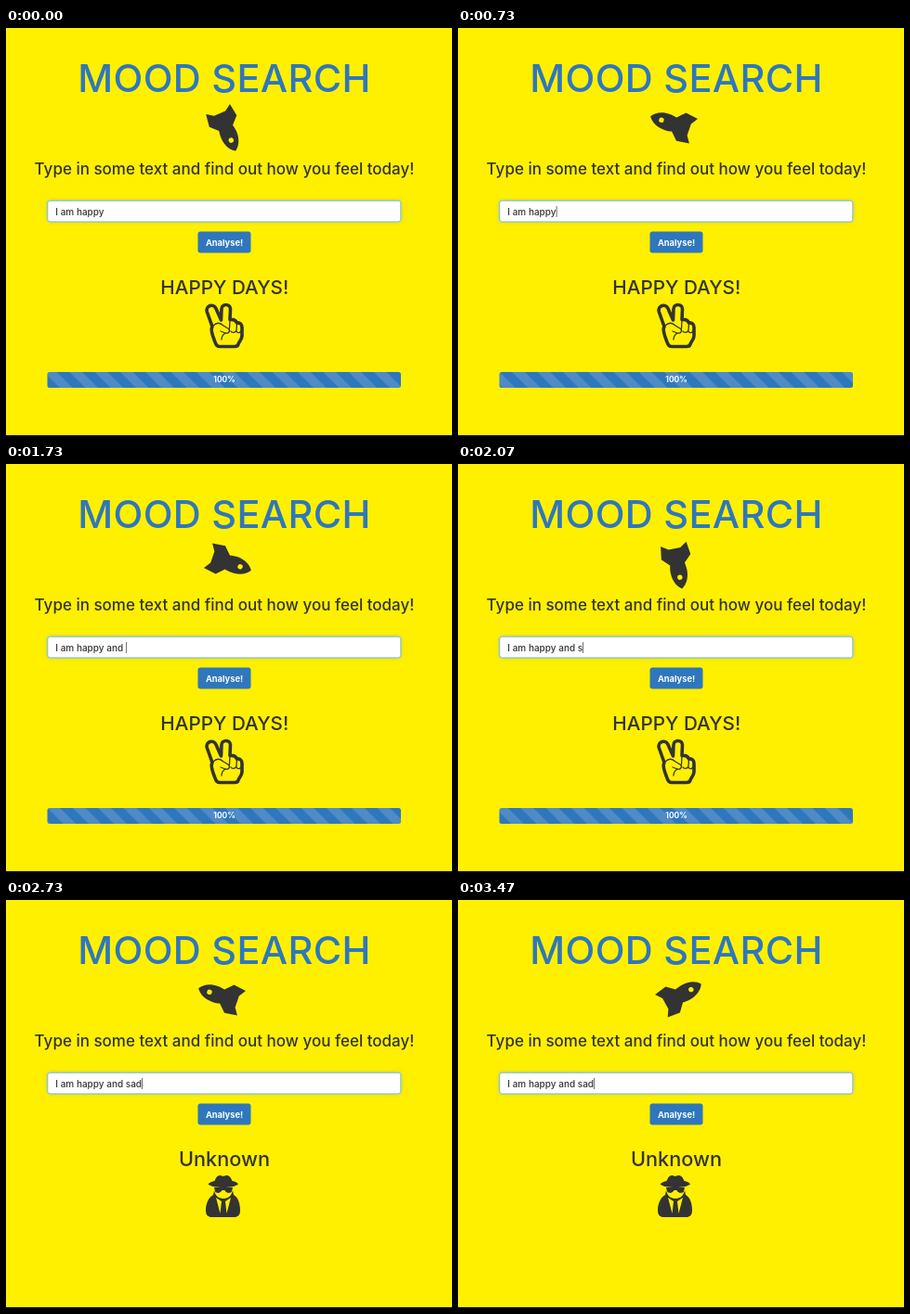
These frames come from a looping animation (480 px wide and 440 px high, 3540 ms). An HTML page:

```html
<!DOCTYPE html>
<html lang="en">
<head>
<meta charset="utf-8">
<title>Mood search</title>
<style>
  html, body { margin: 0; width: 100%; height: 100%; overflow: hidden; background: #fff000; }
  svg { display: block; width: 480px; height: 440px; }
  text { font-family: Inter, sans-serif; font-weight: 500; fill: #333; white-space: pre; }
  .mid { text-anchor: middle; }
  .label { font-weight: 700; fill: #fff; }
  .dark { fill: #333; }
  .blue { fill: #2f77bd; }
  .line { fill: none; stroke: #333; stroke-linejoin: round; stroke-linecap: round; }
</style>
</head>
<body>
<svg viewBox="0 0 480 440">
  <defs>
    <pattern id="stripes" width="28" height="28" patternUnits="userSpaceOnUse">
      <path d="M0 14 14 28H0ZM0 0H14L28 14V28Z" fill="#fff" fill-opacity=".15"/>
    </pattern>
    <filter id="glow" x="-5%" y="-50%" width="110%" height="200%">
      <feGaussianBlur stdDeviation="2"/>
    </filter>
  </defs>
  <rect width="480" height="440" fill="#fff000"/>
  <rect y="439" width="480" height="1" fill="#222"/>

  <text class="mid blue" x="235" y="69" font-size="41.5" letter-spacing=".3">MOOD SEARCH</text>
  <g id="rocket">
    <path class="dark" d="M0-30C6-26 9-19 9-11 9-8 8.500-5 8-3L16 5 14 19 6.500 14H-6.500L-14 19-16 5-8-3C-8.500-5-9-8-9-11-9-19-6-26 0-30Z"/>
    <circle cy="-17.500" r="2.700" fill="#fff000"/>
  </g>
  <text class="mid" x="235" y="158" font-size="17">Type in some text and find out how you feel today!</text>

  <rect x="44.500" y="186" width="380.500" height="23" rx="3" fill="#66afe9" opacity=".6" filter="url(#glow)"/>
  <rect x="44.800" y="186.300" width="380" height="22.600" rx="2.500" fill="#fff" stroke="#66afe9" stroke-width=".8"/>
  <text id="typed" x="53.300" y="201.500" font-size="10"></text>
  <rect id="caret" y="192" width=".7" height="12" fill="#333"/>

  <rect class="blue" x="206.500" y="219.500" width="57" height="23" rx="2.700"/>
  <text class="mid label" x="235" y="234.500" font-size="9.300">Analyse!</text>

  <g id="happy">
    <text class="mid" x="235.300" y="287" font-size="20.700">HAPPY DAYS!</text>
    <path class="line" stroke-width="3.600" d="M222 322 216.300 306C214.500 299.500 223.500 296.500 226 302.500L231.500 315 232 303C232 297 241.500 297 241.500 303L241 314.500C245 314 247.500 315.500 248.500 318 252 317.500 254 319.500 254 323V332C254 336 251 338 250 341 249.500 343 248 343.500 246 343.500H230C226 343.500 225.500 340 224 336 222 331 220 325 222 322Z"/>
    <path class="line" stroke-width="1.300" d="M223 321C227 317 231 318 234 321L239 324C242 326 240 330 236 329L231 327M236 329C233 331 232 334 232 336M241 314.500 240.500 324M248.500 318 248 326C247 329 243 329 242 327M254 325C252 330 249 329 248 327"/>
    <rect class="blue" x="44.500" y="371" width="380.500" height="17" rx="2.500"/>
    <rect x="44.500" y="371" width="380.500" height="17" rx="2.500" fill="url(#stripes)"/>
    <text class="mid label" x="235" y="381.500" font-size="8.400">100%</text>
  </g>

  <g id="unknown">
    <text class="mid" x="235" y="287" font-size="21.700">Unknown</text>
    <path class="dark" d="M217.500 306.500C219 304.500 222 303.500 224.500 303 226 299 227.500 297 230 297 232 297 232 297.800 233.500 297.800S236 297 238 297C240 297 242 299 243.500 303 246.500 303.500 249 304.500 250 306.500 247 309 241 310 234 310S220 309 217.500 306.500Z"/>
    <path class="dark" d="M224 310H244L243 314C242 317 237 317 235.500 313H232.500C231 317 226 317 225 314Z"/>
    <path class="dark" d="M224 313C225 318 228 322 234 322S243 318 244 313L245 318C250 321 252 327 252 335 252 340 249 342 246 342H221C218 342 215 340 215 335 215 327 218 321 223 318Z"/>
    <path fill="#fff000" d="M226.500 315.500C228 319 230.500 321 233.500 321S239.500 319 241 315.500C239 316.500 237 316 235.500 314H232C230.500 316 228.500 316.500 226.500 315.500ZM226 321 232 325 230.500 338ZM242 321 236 325 237.500 338Z"/>
  </g>
</svg>
<script>
  const LOOP = 3540, STEP = 1000 / 15, TILE = 27.3;
  const TEXT = "I am happy and sad";
  const KEY_TIMES = [870, 1000, 1070, 1270, 1470, 2070, 2200, 2330];
  const CARET_ON = [[330, 2870], [3330, LOOP]];
  const $ = id => document.getElementById(id);
  const [rocket, stripes, typed, caret, happy, unknown] =
    ["rocket", "stripes", "typed", "caret", "happy", "unknown"].map($);
  const show = (node, on) => node.setAttribute("visibility", on ? "visible" : "hidden");

  function draw(now) {
    const clock = Math.floor((now % LOOP) / 10);
    const t = Math.floor(clock * 0.15 + 0.06) * STEP;   // 15 steps per second
    const time = t + 5;
    const keys = KEY_TIMES.filter(k => time >= k).length;
    const done = keys === KEY_TIMES.length;

    rocket.setAttribute("transform", `translate(235.500 105) rotate(${157 + t * 0.18})`);
    stripes.setAttribute("patternTransform",
      `translate(${41 - t * TILE / 2000} 371) scale(${TILE / 28})`);
    typed.textContent = TEXT.slice(0, TEXT.length - KEY_TIMES.length + keys);
    caret.setAttribute("x", 53.500 + typed.getComputedTextLength());
    show(caret, CARET_ON.some(([from, to]) => time >= from && time < to));
    show(happy, !done);
    show(unknown, done);
    requestAnimationFrame(() => draw(performance.now()));
  }
  draw(0);
</script>
</body>
</html>
```
